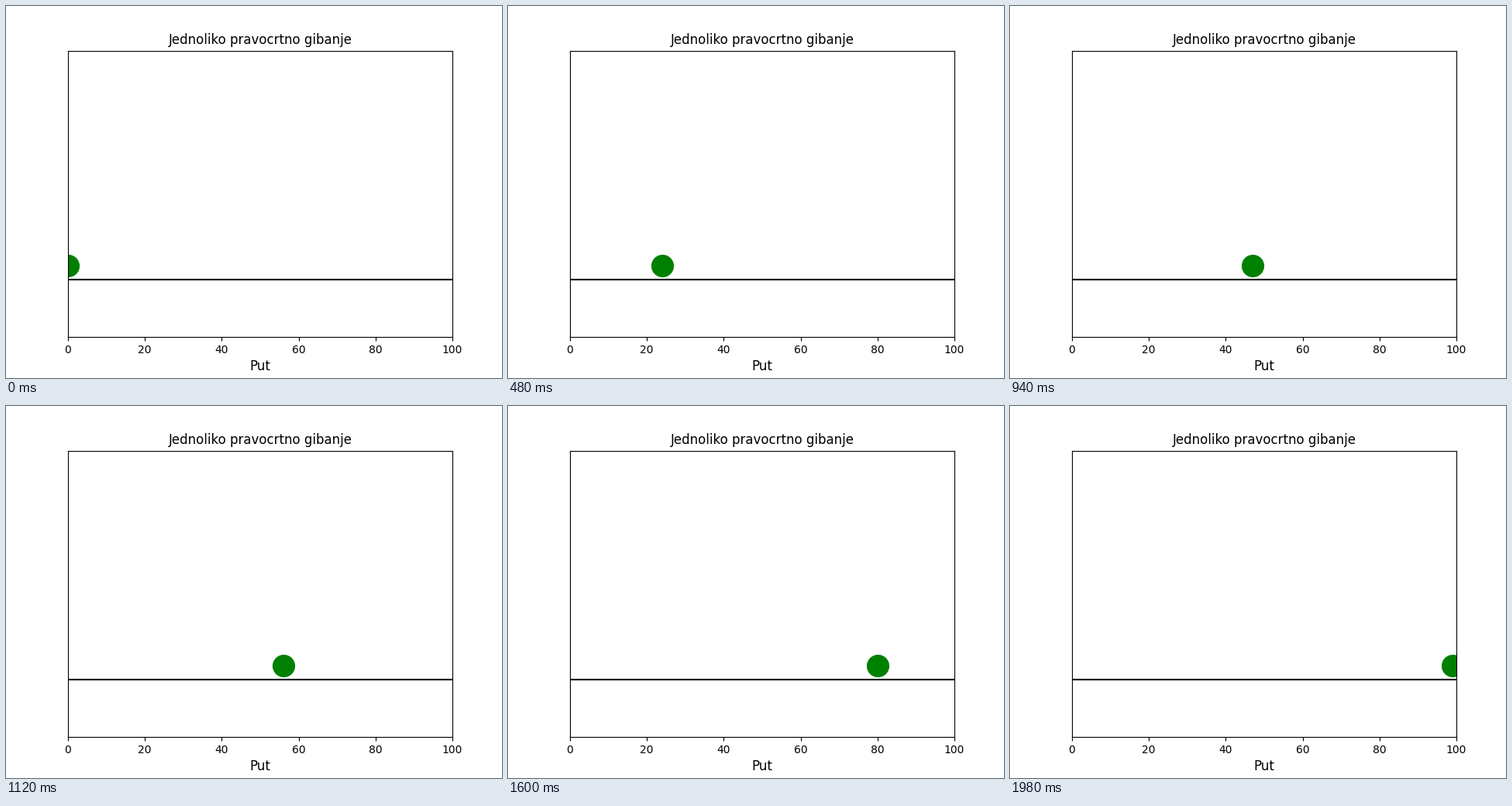
Recreate the animation shown at these times as a matplotlib script. Size 640 px wide and 480 px high, loop 2 s.

```python
import matplotlib.pyplot as plt
from matplotlib.animation import FuncAnimation

FRAMES = 100
INTERVAL = 20  # ms

plt.rcParams["font.family"] = "DejaVu Sans"

fig, ax = plt.subplots(figsize=(6.4, 4.8), dpi=100)
ax.set(xlim=(0, 100), ylim=(-1, 4), yticks=[], xlabel="Put",
       title="Jednoliko pravocrtno gibanje")
ax.xaxis.label.set_size(12)
ax.title.set_size(12)

ax.plot([0, 100], [0, 0], color="black", lw=1.5)
ball, = ax.plot([0], [0.25], "o", color="green", ms=20)


def update(i):
    """Constant speed: one unit of path per step."""
    ball.set_data([i], [0.25])
    return ball,


anim = FuncAnimation(fig, update, frames=FRAMES, interval=INTERVAL,
                     repeat=True, repeat_delay=0)
plt.show()
```
